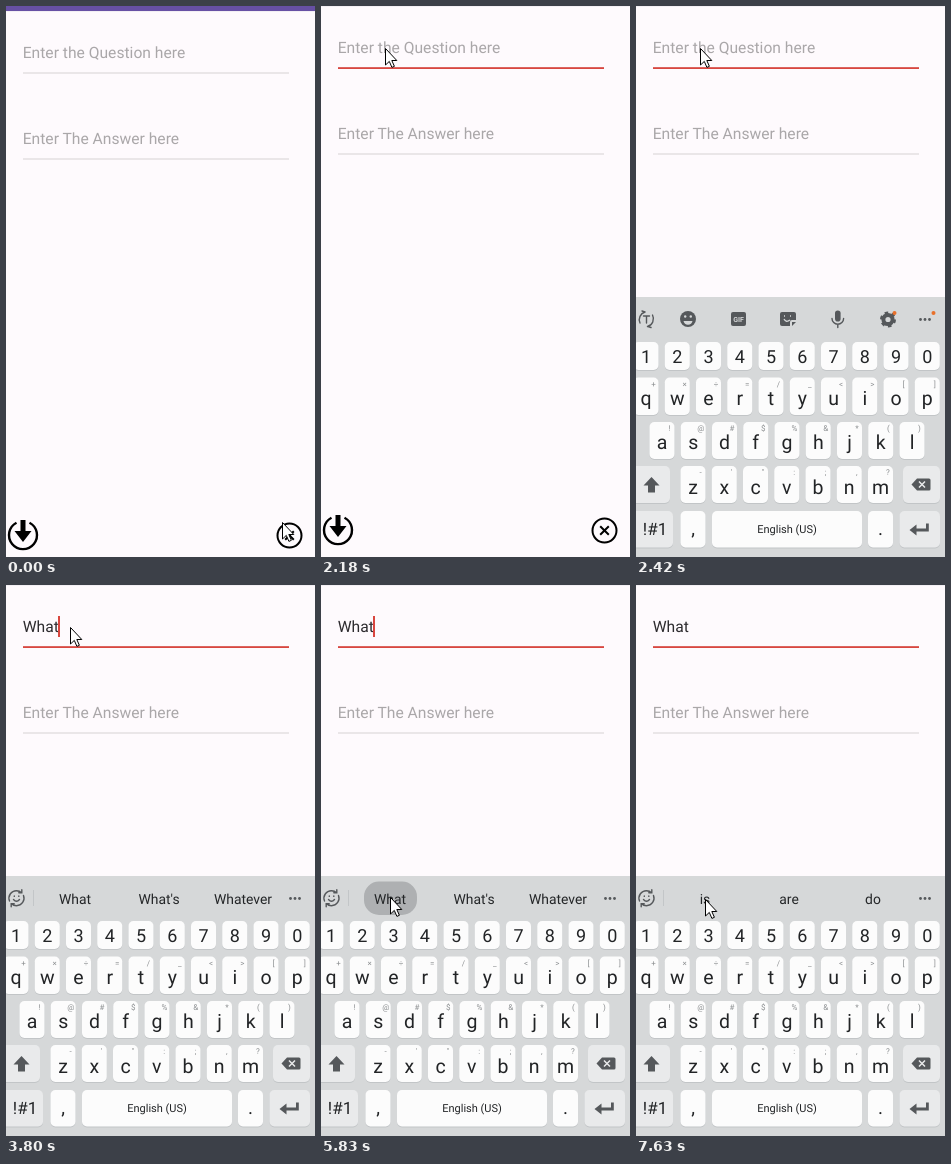
Recreate the animation shown at these times as an HTML page. Size 309 by 551 pixels, loop 8 s.

```html
<!DOCTYPE html>
<html lang="en">
<head>
<meta charset="utf-8">
<title>Flashcard entry</title>
<style>
  html, body { margin: 0; width: 100%; height: 100%; overflow: hidden; background: #fefafd; }
  svg { display: block; width: 309px; height: 551px; }
  text { font-family: Roboto, sans-serif; text-rendering: geometricPrecision; white-space: pre; }
  .field { font-size: 15.65px; fill: #2d2b2e; }
  .hint { fill: #aaa7a9; }
  .word { font-size: 13.9px; fill: #242628; text-anchor: middle; }
  .key { font-size: 19.5px; fill: #222426; text-anchor: middle; }
  .digit { font-size: 18px; }
  .mark { font-size: 8px; fill: #8d9092; text-anchor: middle; }
  .line { fill: none; stroke: #55585b; stroke-width: 1.4; stroke-linecap: round; }
  .solid { fill: #55585b; }
</style>
</head>
<body>
<svg viewBox="0 0 309 551">
  <g id="page">
    <rect y="-5" width="309" height="5" fill="#6750a4"/>
    <rect width="309" height="1" fill="#f3eff4"/>
    <text id="hint" class="field hint" x="16.7" y="47">Enter the Question here</text>
    <text class="field hint" x="16.7" y="133">Enter The Answer here</text>
    <g id="entry"></g>
    <rect x="17" y="61.5" width="266" height="1" fill="#d5d2d4"/>
    <rect id="focus" x="17" y="61.2" width="266" height="1.8" fill="#d9463f"/>
    <rect x="17" y="147.5" width="266" height="1" fill="#d5d2d4"/>
    <rect id="caret" y="31" width="2" height="21" fill="#d9463f"/>
    <g fill="none" stroke="#000">
      <path d="M10.5 511.7A14 14 0 1 0 23.5 511.7" stroke-width="2.4"/>
      <path d="M14.5 509h5v11h6l-8.5 11-8.5-11h6z" fill="#000" stroke="none"/>
      <circle cx="283.5" cy="524.5" r="12" stroke-width="2"/>
      <path d="M279.2 520.2l8.6 8.6m0-8.6l-8.6 8.6" stroke-width="2"/>
    </g>
  </g>

  <g id="keyboard">
    <rect y="291" width="309" height="260" fill="#d6d8d9"/>
    <g id="tools">
      <path class="line" d="M4 317a8 8 0 0 1 5-11M16.500 309a8 8 0 0 1-5 11.500M9 306l-3-1m6 15.500l3 1M7.500 310h6m-3 0v7"/>
      <circle class="solid" cx="52" cy="313" r="8"/>
      <path d="M47.500 315h9a4.600 4.600 0 0 1-9 0z" fill="#d6d8d9"/>
      <circle cx="49.200" cy="310.500" r="1.200" fill="#d6d8d9"/>
      <circle cx="54.800" cy="310.500" r="1.200" fill="#d6d8d9"/>
      <rect class="solid" x="95" y="306" width="15" height="14" rx="2"/>
      <text x="102.500" y="315.700" font-size="7" font-weight="700" text-anchor="middle" fill="#d6d8d9">GIF</text>
      <path class="solid" d="M146 306h12a2 2 0 0 1 2 2v6h-4a2 2 0 0 0-2 2v4h-8a2 2 0 0 1-2-2v-10a2 2 0 0 1 2-2zM156 320v-4h4z"/>
      <path d="M148 313q2 4 6 1M148 310h1m5 0h1" fill="none" stroke="#d6d8d9" stroke-width="1.300"/>
      <rect class="solid" x="199" y="304.500" width="5.600" height="11" rx="2.800"/>
      <path class="line" d="M196 312.500a5.800 5.800 0 0 0 11.600 0M201.800 318.500v3"/>
      <circle cx="252" cy="313.500" r="4.600" fill="none" stroke="#55585b" stroke-width="4"/>
      <circle cx="252" cy="313.500" r="6.800" fill="none" stroke="#55585b" stroke-width="2.400" stroke-dasharray="3.560"/>
      <circle cx="258.500" cy="307" r="2" fill="#e8702a"/>
      <circle cx="297.500" cy="307" r="2" fill="#e8702a"/>
    </g>
    <g id="suggest">
      <path class="line" d="M3.500 316a7.500 7.500 0 0 1 7-10.300q3 0 5 2M17.500 310.500a7.500 7.500 0 0 1-7 10.200q-3 0-5-2M15.800 304.800v3h-3M5.200 321.700v-3h3M7.500 314.500q3 3.500 6 0M8.300 311v.4m4.500-.4v.4"/>
      <rect x="27" y="305" width="1" height="16" fill="#c3c6c8"/>
      <rect id="ripple" x="43" y="296.500" width="53" height="33.500" rx="15" fill="#aeb0b2"/>
    </g>
    <g class="solid">
      <circle cx="284.500" cy="313.500" r="1.400"/><circle cx="289" cy="313.500" r="1.400"/><circle cx="293.500" cy="313.500" r="1.400"/>
    </g>
    <g id="keys"></g>
    <path class="solid" d="M15.500 471l8 8.500h-4.500v7h-7v-7H7.500z"/>
    <path class="solid" d="M281 472.500h12a1.500 1.500 0 0 1 1.500 1.500v9a1.500 1.500 0 0 1-1.500 1.500h-12l-5.500-6z"/>
    <path d="M283 475.500l6 6m0-6l-6 6" stroke="#e9eaeb" stroke-width="1.500"/>
    <path class="solid" d="M273.500 524l7-5.500v4h9.500v-5h2.800v8h-12.300v4z"/>
  </g>

  <path id="pointer" d="M.5.5v16.500l3.800-3.600 2.600 6 2.500-1.100-2.600-5.800h5z" fill="#fff" stroke="#000" stroke-linejoin="round"/>
</svg>
<script>
const LOOP = 8000;
const $ = id => document.getElementById(id);

function add(parent, tag, attrs, content = '') {
  const el = document.createElementNS('http://www.w3.org/2000/svg', tag);
  for (const name in attrs) el.setAttribute(name, attrs[name]);
  el.textContent = content;
  return parent.appendChild(el);
}

// Each row is [time, value]; a value holds until the next row.
function hold(el, prop, rows) {
  const end = [LOOP, rows[rows.length - 1][1]];
  el.animate([...rows, end].map(([time, value]) =>
    ({ offset: time / LOOP, [prop]: value, easing: 'step-end' })),
    { duration: LOOP, iterations: Infinity });
}
const move = (el, rows) =>
  hold(el, 'transform', rows.map(([t, x, y]) => [t, `translate(${x}px, ${y}px)`]));
// Visibility flips at every listed time.
const flip = (el, times, shown = 0) =>
  hold(el, 'opacity', [0, ...times].map((t, i) => [t, (i + shown) % 2]));
const between = (el, from, to) => flip(el, to < LOOP ? [from, to] : [from]);

const PITCH = 31.25;
function key(x, y, w, h, fill = '#fcfcfc') {
  add($('keys'), 'rect', { x, y: y + 1, width: w, height: h, rx: 5, fill: '#c2c5c7' });
  add($('keys'), 'rect', { x, y, width: w, height: h, rx: 5, fill });
}
function row(labels, marks, x0, y, h, base, cls) {
  [...labels].forEach((label, i) => {
    const x = x0 + i * PITCH;
    key(x - 12.5, y, 25, h);
    add($('keys'), 'text', { class: cls, x, y: base }, label);
    if (marks[i]) add($('keys'), 'text', { class: 'mark', x: x + 7.5, y: y + 9 }, marks[i]);
  });
}
row('1234567890', '', 10, 336, 28, 357, 'key digit');
row('qwertyuiop', '+×÷=/_<>[]', 10, 371.5, 37.5, 399, 'key');
row('asdfghjkl', '!@#$%&*()', 26, 416, 37, 443, 'key');
row('zxcvbnm', '-\'":;,?', 57, 460, 37, 487.5, 'key');
const SOFT = '#e9eaeb';
key(-5, 460, 39, 37, SOFT);
key(267, 460, 37, 37, SOFT);
key(-5, 505, 42, 36.5, SOFT);
key(44.500, 505, 25, 36.5);
key(76, 505, 150, 36.5);
key(232, 505, 25, 36.5);
key(263.500, 505, 40.500, 36.5, SOFT);
for (const [label, x, y, size] of [
  ['!#1', 19, 529, 17], [',', 57, 529, 19], ['English (US)', 151, 527, 11], ['.', 244.5, 529, 19]
]) add($('keys'), 'text', { class: 'key', x, y, style: `font-size:${size}px` }, label);

// Typed text
[['W', 2690, 3350], ['Wh', 3350, 3500], ['Wha', 3500, 3650], ['What', 3650, LOOP]]
  .forEach(([text, from, to]) =>
    between(add($('entry'), 'text', { class: 'field', x: 16.7, y: 47 }, text), from, to));

// Suggested words
[['W', 69, 2690, 3350], ['Wh', 69, 3350, 3500], ['We', 153, 2690, 3500], ['Was', 237, 2690, 3500],
 ['Wha', 69, 3500, 3800], ['What', 153, 3500, 3800], ["What's", 237, 3500, 3800],
 ['What', 69, 3800, 6230], ["What's", 153, 3800, 6230], ['Whatever', 237, 3800, 6230],
 ['is', 69, 6230, LOOP], ['are', 153, 6230, LOOP], ['do', 237, 6230, LOOP]]
  .forEach(([text, x, from, to]) =>
    between(add($('suggest'), 'text', { class: 'word', x, y: 318.7 }, text), from, to));

flip($('hint'), [2690], 1);
flip($('focus'), [1520]);
flip($('tools'), [2690], 1);
flip($('suggest'), [2690]);
flip($('caret'), [1520, 2180, 2690, 3080, 3350, 4200, 4620, 5130, 5580, 6590, 7090, 7630]);
move($('caret'), [[0, 17, 0], [2690, 31, 0], [3350, 39.5, 0], [3500, 48, 0], [3650, 52, 0], [6110, 56, 0]]);
move($('page'), [[0, 0, 5], [280, 0, 0]]);
move($('keyboard'), [[0, 0, 262], [2300, 0, 110], [2420, 0, 0]]);
hold($('ripple'), 'opacity', [[0, 0], [5830, 1], [5980, .9], [6110, .6], [6230, .3], [6350, 0]]);
move($('pointer'), [
  [0, 276, 516], [280, 268, 490], [400, 236, 400], [520, 186, 270], [640, 128, 158],
  [770, 93, 93], [890, 78, 62], [1010, 70, 46], [1130, 66, 43], [1250, 64, 42],
  [4740, 41, 72], [4860, 58, 121], [5010, 78, 205], [5130, 91, 286], [5280, 87, 304],
  [5430, 77, 305], [5580, 70, 310], [5700, 69, 312], [7090, 70, 313], [7230, 69, 314]
]);
</script>
</body>
</html>
```
